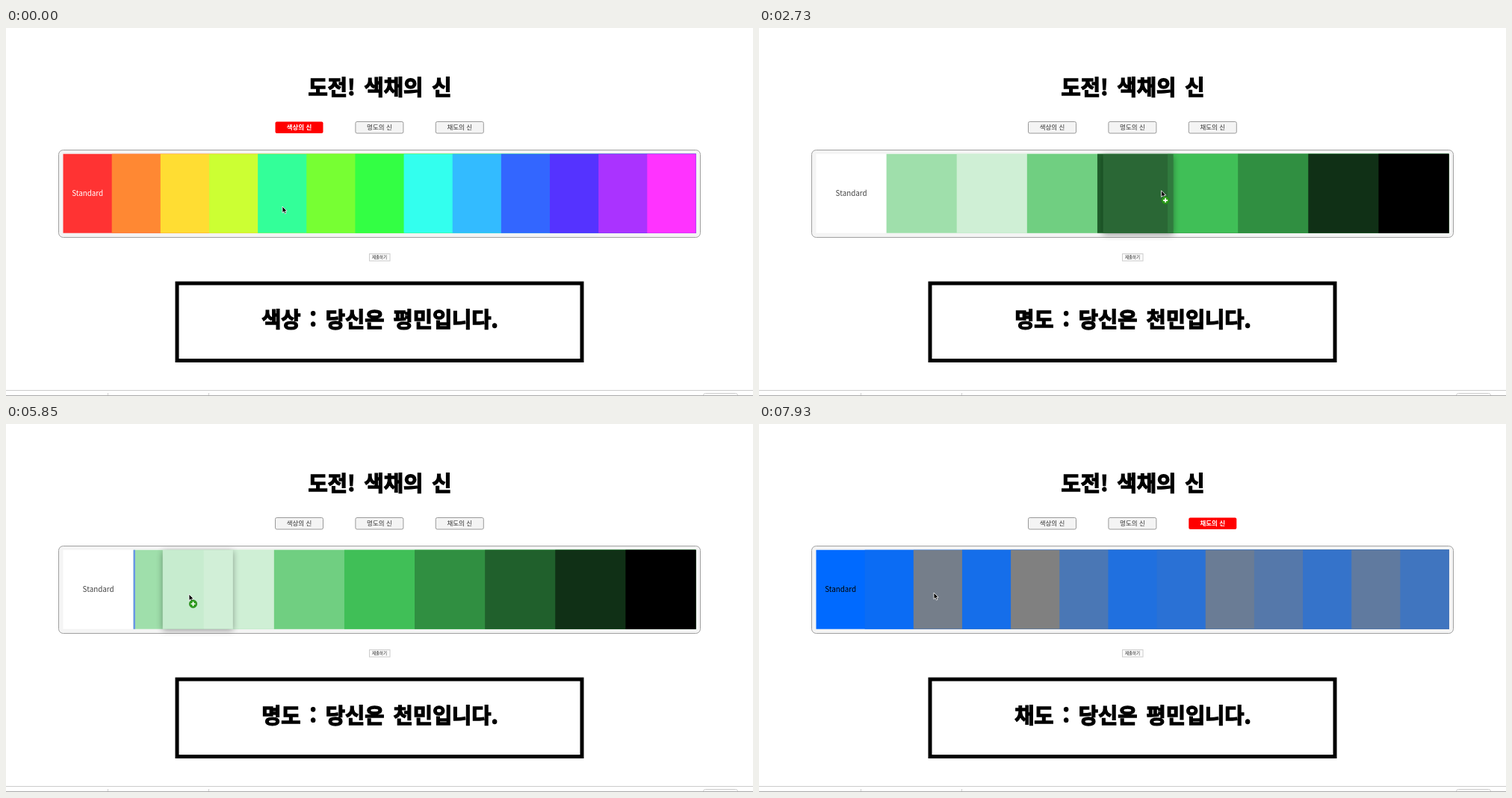
These frames come from a looping animation (1000 by 493 pixels, 8000 ms). An HTML page:

```html
<!DOCTYPE html>
<html lang="ko">
<head>
<meta charset="utf-8">
<title>색채의 신</title>
<style>
  html, body { margin: 0; width: 100%; height: 100%; overflow: hidden; background: #fff; }
  svg { display: block; width: 100%; height: 100%; }
  text { font-family: "Noto Sans CJK KR", "Noto Sans CJK", "Noto Sans", sans-serif; text-anchor: middle; }
  .big { font-size: 28.5px; font-weight: 900; word-spacing: 4px; stroke: #000; stroke-width: 1.3px; }
  .tab { font-size: 8.5px; fill: #333; }
  .tab.on { fill: #fff; font-weight: 700; }
  .label { font-size: 9.8px; }
  .small { font-size: 5.5px; fill: #222; }
  .ghost { filter: drop-shadow(0 2px 4px rgba(0, 0, 0, .45)); }
</style>
</head>
<body>
<svg viewBox="0 0 1000 493">
  <text class="big" x="500.5" y="90">도전! 색채의 신</text>
  <g id="tabs"></g>
  <rect x="70.5" y="163.5" width="859" height="117" rx="6" fill="#f4f4f4" stroke="#a0a0a0"/>
  <g id="tiles"></g>
  <rect x="486.5" y="302.5" width="27.5" height="9.5" fill="#fbfbfb" stroke="#ccc"/>
  <text class="small" x="500" y="309.3">제출하기</text>
  <rect x="229" y="342" width="542" height="103.5" fill="#fff" stroke="#000" stroke-width="5"/>
  <text class="big" id="result" x="500.5" y="401"></text>
  <path d="M0 485.5H1000M136.5 489V493M271.5 489V493M933.5 493v-1q0-2.500 3-2.500h40q3 0 3 2.500v1" fill="none" stroke="#ccc"/>
  <path d="M0 492.500H1000" stroke="#aaa"/>
  <g id="drag"></g>
  <g id="cursor">
    <path d="M0 0V8.600L2 6.800L3.400 9.900L5 9.200L3.600 6.200H6.200Z" fill="#000" stroke="#fff" stroke-width=".8"/>
    <g id="plus">
      <circle cx="5.500" cy="13" r="5.200" fill="#2c9c1c" stroke="#1d7a12" stroke-width=".6"/>
      <path d="M2.500 13h6M5.500 10v6" stroke="#fff" stroke-width="1.700"/>
    </g>
  </g>
</svg>
<script>
const LOOP = 8000, STEP = 130, LEFT = 76.5, WIDTH = 847, TOP = 168.7, HEIGHT = 106;
const $ = id => document.getElementById(id);
const range = n => [...Array(n).keys()];
const tabNames = ['색상의 신', '명도의 신', '채도의 신'];

// Each drag carries one tile to its sorted slot.
const scenes = [
  { from: 0, tab: 0, result: '색상 : 당신은 평민입니다.', ink: '#fff',
    tiles: range(13), color: k => `hsl(${k * 25},100%,60%)`,
    drags: [{ start: 650, end: 1560, slot: 4, to: 6 }] },
  { from: 2210, tab: -1, result: '명도 : 당신은 천민입니다.', ink: '#444',
    tiles: range(9), color: k => `hsl(131,50%,${100 - k * 12.5}%)`,
    drags: [{ start: 2600, end: 3770, slot: 4, to: 6 }, { start: 5460, end: 6240, slot: 2, to: 1 }] },
  { from: 7150, tab: 2, result: '채도 : 당신은 평민입니다.', ink: '#000',
    tiles: [0, 1, 11, 2, 12, 7, 3, 4, 10, 8, 5, 9, 6], color: k => `hsl(215,${100 - k * 100 / 12}%,50%)`,
    drags: [] }
];

// Stops of the cursor: time, x, y. It eases from one to the next.
const stops = [
  [0, 370, 239], [650, 344, 244], [1560, 558, 247], [2210, 502, 133], [2600, 531, 217.5],
  [3770, 752, 226], [3900, 752, 226], [5070, 319, 228.5], [5460, 300, 228], [6240, 190, 228],
  [6760, 481, 213.5], [7150, 605, 133], [7930, 234, 226]
];

function cursorAt(t) {
  const i = Math.max(1, stops.findIndex(s => s[0] >= t));
  const [t0, x0, y0] = stops[i - 1], [t1, x1, y1] = stops[i];
  const u = (t - t0) / (t1 - t0), ease = u * u * (3 - 2 * u);
  return { x: x0 + (x1 - x0) * ease, y: y0 + (y1 - y0) * ease };
}

const isDone = (drag, t) => t >= drag.end + STEP;

// Starts from the solved row and takes back the drags still to come.
function orderAt(scene, t) {
  const order = scene.tiles.slice();
  for (const d of scene.drags.filter(d => !isDone(d, t)).reverse())
    order.splice(d.slot, 0, order.splice(d.to, 1)[0]);
  return order;
}

const rect = (x, y, w, h, fill, extra = '') =>
  `<rect x="${x}" y="${y}" width="${w}" height="${h}" fill="${fill}" ${extra}/>`;

function drawTabs(active) {
  return tabNames.map((name, i) => {
    const x = 360.5 + i * 107.4, on = i === active;
    return rect(x, 125.5, 64, 15.5, on ? '#f00' : '#f4f4f4', `rx="2" stroke="${on ? 'none' : '#999'}"`) +
      `<text class="tab ${on ? 'on' : ''}" x="${x + 32}" y="136.400">${name}</text>`;
  }).join('');
}

function draw(t) {
  const scene = scenes.findLast(s => t >= s.from);
  const order = orderAt(scene, t), w = WIDTH / order.length;
  const cursor = cursorAt(t);
  const drag = scene.drags.find(d => t >= d.start && !isDone(d, t));
  const held = drag && t < drag.end;

  $('tabs').innerHTML = drawTabs(scene.tab);
  $('result').textContent = scene.result;
  // Every tile reaches to the right end, so no seams show.
  let tiles = order.map((k, i) =>
    rect(LEFT + i * w, TOP, WIDTH - i * w, HEIGHT, scene.color(k))).join('');
  tiles += `<text class="label" x="${LEFT + w / 2}" y="225" fill="${scene.ink}">Standard</text>`;

  let ghost = '';
  if (drag) {
    const over = Math.floor((cursor.x - LEFT) / w);
    if (over !== drag.slot) tiles += rect(LEFT + over * w, TOP, 2.2, HEIGHT, '#6490ea');
    if (held) {
      const grab = cursorAt(drag.start);
      const tint = `color-mix(in srgb, ${scene.color(order[drag.slot])} 94%, #fff)`;
      ghost = rect(LEFT + drag.slot * w + cursor.x - grab.x, TOP + cursor.y - grab.y, w, HEIGHT,
        tint, 'class="ghost" opacity=".8"');
    }
  }
  $('tiles').innerHTML = tiles;
  $('drag').innerHTML = ghost;
  $('plus').style.display = held ? '' : 'none';
  $('cursor').setAttribute('transform', `translate(${cursor.x} ${cursor.y})`);
}

let shown = -1;
const origin = performance.now();
function tick(now) {
  const t = Math.floor(Math.max(0, now - origin) % LOOP / STEP) * STEP;
  if (t !== shown) draw(shown = t);
  requestAnimationFrame(tick);
}
tick(origin);
</script>
</body>
</html>
```
